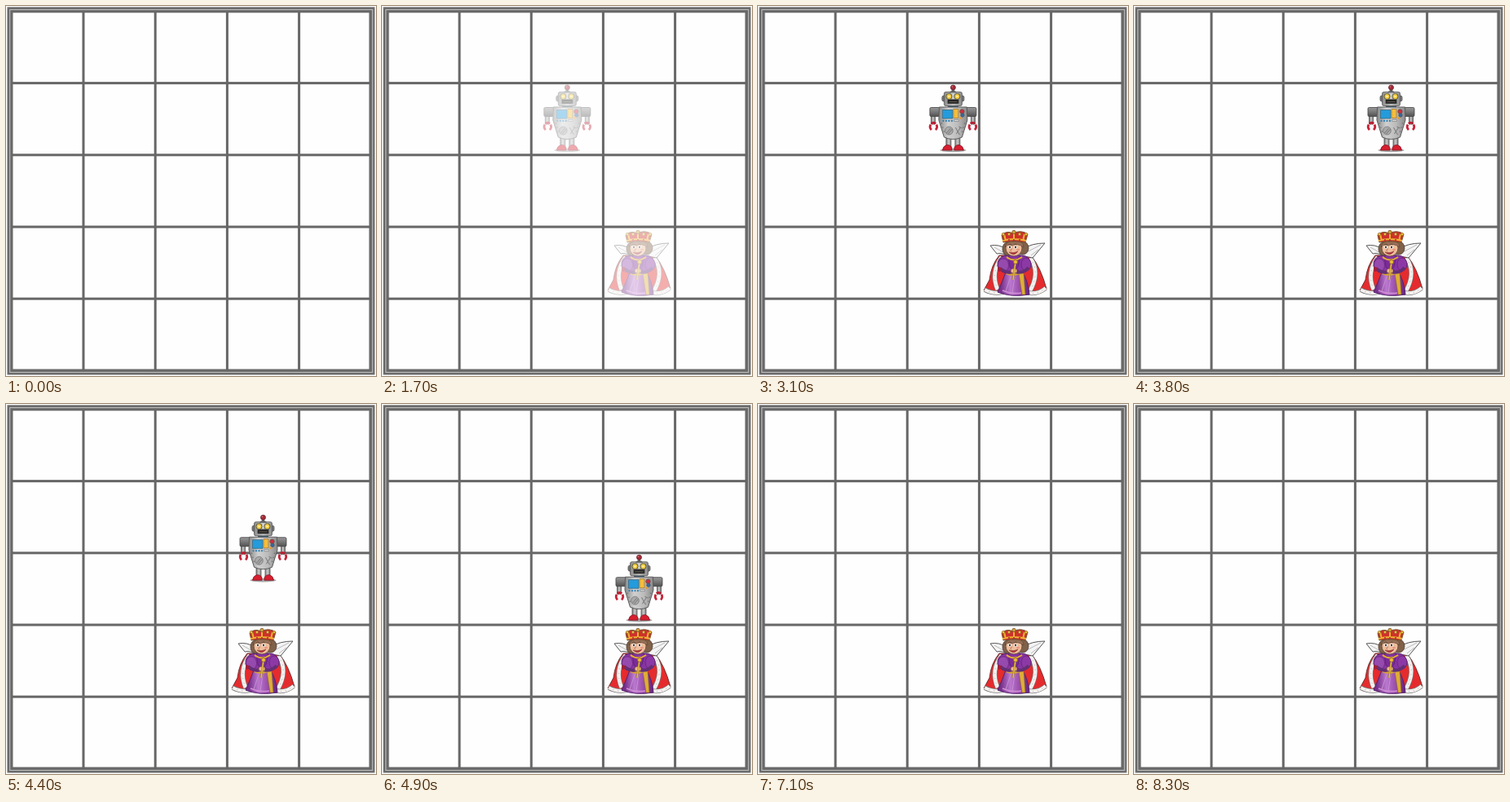
Write an HTML page with a canvas that moves like this. It is 454 by 454 pixels and loops after 8.5 s.

```html
<!DOCTYPE html>
<html lang="en">
<head>
<meta charset="utf-8">
<title>Robot and queen on a grid</title>
<style>
  html, body { margin: 0; width: 100%; height: 100%; overflow: hidden; background: #fefefe; }
  canvas { display: block; width: 454px; height: 454px; }
</style>
</head>
<body>
<canvas id="stage" width="454" height="454"></canvas>
<script>
const ctx = document.getElementById('stage').getContext('2d');
const LOOP = 8500, CELL = 88.2;

const clamp = v => Math.max(0, Math.min(1, v));
const progress = (t, from, to) => clamp((t - from) / (to - from));
const ease = p => p * p * (3 - 2 * p);

function paint(fill, stroke, width = 0.8) {
  if (fill) { ctx.fillStyle = fill; ctx.fill(); }
  if (stroke) { ctx.strokeStyle = stroke; ctx.lineWidth = width; ctx.stroke(); }
}
function box(x, y, w, h, fill, stroke, r = 0) {
  ctx.beginPath();
  ctx.roundRect(x, y, w, h, r);
  paint(fill, stroke);
}
function oval(x, y, rx, ry, fill, stroke, width) {
  ctx.beginPath();
  ctx.ellipse(x, y, rx, ry, 0, 0, Math.PI * 2);
  paint(fill, stroke, width);
}
function shape(d, fill, stroke, width) {
  const path = new Path2D(d);
  if (fill) { ctx.fillStyle = fill; ctx.fill(path); }
  if (stroke) { ctx.strokeStyle = stroke; ctx.lineWidth = width || 0.8; ctx.stroke(path); }
}
function gradient(x0, y0, x1, y1, ...colors) {
  const g = ctx.createLinearGradient(x0, y0, x1, y1);
  colors.forEach((c, i) => g.addColorStop(i / (colors.length - 1), c));
  return g;
}
function mirrored(draw) {
  for (const side of [-1, 1]) {
    ctx.save();
    ctx.scale(side, 1);
    draw(side);
    ctx.restore();
  }
}

function drawGrid() {
  ctx.fillStyle = '#fefefe';
  ctx.fillRect(0, 0, 454, 454);
  ctx.strokeStyle = '#696969';
  ctx.lineWidth = 7;
  ctx.strokeRect(5, 4.8, 444, 444.2);
  ctx.strokeStyle = '#bcbcbc';
  ctx.lineWidth = 1.1;
  ctx.strokeRect(4.7, 4.5, 445, 445);
  ctx.fillStyle = '#676767';
  for (let i = 1; i < 5; i++) {
    const p = 6.8 + i * CELL;
    ctx.fillRect(p - 1.5, 7, 3, 441);
    ctx.fillRect(7, p - 1.9, 441, 3);
  }
}

// Origin: top of the antenna, on the centre line.
function drawRobot() {
  oval(0, 80, 16, 2.2, 'rgba(60,60,60,.45)');

  mirrored(() => {
    box(2.5, 64, 6, 12, gradient(2, 0, 9, 0, '#777', '#ccc', '#666'), '#555');
    shape('M1.5 80V77Q3 73 8 73.5Q12.5 75 13 80Z', '#d71f30', '#801522');
    box(22, 37, 5, 11, gradient(22, 0, 27, 0, '#777', '#c8c8c8', '#666'), '#555');
    box(16, 27.5, 12.5, 11, gradient(0, 27, 0, 39, '#9b9b9b', '#777', '#4d4d4d'), '#444', 1.5);
    ctx.beginPath();
    ctx.arc(24, 50, 3.7, -0.25 * Math.PI, 1.25 * Math.PI, true);
    paint(null, '#b91f32', 3);
    shape('M20.5 48.5Q18.5 52 21.5 55M27.5 48.5Q29.5 52 26.5 55', null, '#c62338', 2.8);
  });

  box(-6, 23, 12, 5, '#315b78', '#444');
  shape('M-17 27H17L17.5 43L11 64Q0 69 -11 64L-17.5 43Z',
    gradient(-18, 0, 18, 0, '#858585', '#d0d0d0', '#bbbbbb', '#888888'), '#5b5b5b', 1);

  box(-13, 30.5, 12.5, 10.5, '#249bdc', '#37677f');
  box(0.5, 29.5, 6, 11, '#f5bd3b', '#a57a36');
  oval(11, 32.5, 2.7, 2.7, '#d22d3d', '#555');
  oval(11.5, 37, 2.2, 2.2, '#3568a0', '#555');
  oval(9.5, 40.5, 1.5, 1.5, '#e49b32');
  for (let x = -12; x < 0; x += 3.5) oval(x, 44, 1.15, 1.15, '#3382b4');
  box(1, 42.5, 6, 2, '#dddddd', '#888');

  oval(-5, 56, 4.8, 5, '#aaa', '#747474', 0.8);
  shape('M-8 59L-3 53M-6 60L-1 54M3 52L8 61M4 60L9 52M7 51L11 53',
    null, '#757575', 1);
  mirrored(() => {
    for (let y = 47; y < 62; y += 5) oval(14 - (y - 47) * .28, y, .7, .7, '#686868');
  });

  box(-13.5, 13, 27, 7, '#777', '#555', 2);
  box(-11, 8.5, 22, 17, gradient(-11, 0, 11, 0, '#868686', '#d2d2d2', '#888'), '#555', 2);
  box(-7, 17.5, 14, 5.5, '#252525', '#777', 1);
  shape('M-5 20.5H5', null, '#77705d', .7);
  mirrored(() => {
    oval(5, 14, 3.6, 3.6, '#f0c83b', '#5d5d45', 1);
    oval(5, 14, 1.3, 1.3, '#fff0a2');
  });
  shape('M-4 9Q0 4 4 9Z', '#777', '#4e4e4e');
  box(-1, 4, 2, 4, '#555');
  oval(0, 3, 3, 3, '#a72a38', '#5d2830');
  oval(-1, 2, .8, .8, '#e97d7c');
}

function drawQueen() {
  // Cape and ermine
  shape('M296 306Q286 318 284 336L277 349Q290 356 306 352L326 352Q343 355 354 347Q347 321 335 306Z',
    '#e52b2d', '#6d3030', 1);
  shape('M299 308Q285 327 294 348M334 309Q347 327 333 351', null, '#777', 6);
  shape('M299 308Q285 327 294 348M334 309Q347 327 333 351', null, '#f4f0ee', 4.6);
  shape('M278 348Q289 354 301 351M331 352Q344 354 353 346', null, '#777', 5.5);
  shape('M278 348Q289 354 301 351M331 352Q344 354 353 346', null, '#f5f2f0', 4.2);
  ctx.setLineDash([1, 5]);
  shape('M299 308Q285 327 294 348M334 309Q347 327 333 351M278 348Q289 354 301 351M331 352Q344 354 353 346',
    null, '#aaa', 1);
  ctx.setLineDash([]);

  // Stand-up collar
  shape('M285 294Q296 292 304 298L309 309Q301 302 293 304Z', '#f4f4f4', '#555', 1);
  shape('M352 291Q336 291 325 298L320 309Q329 306 337 309Z', '#f4f4f4', '#555', 1);
  shape('M290 296L304 304M347 293L326 304M335 306L344 299', null, '#aaa', .8);

  // Dress
  shape('M305 324Q300 338 294 351Q311 358 333 354Q332 338 323 324Z',
    gradient(298, 0, 333, 0, '#75308a', '#bb78cf', '#984ca9', '#64227c'), '#55236c', 1);
  shape('M303 306Q293 309 294 319Q297 328 308 328L313 319L323 328Q336 324 335 316Q332 306 324 306Z',
    '#8734a3', '#56236a', 1);
  oval(301, 318, 6.5, 8, '#964aae', '#672777', .7);
  oval(329, 317, 6, 8, '#8c39a5', '#602270', .7);
  shape('M307 307Q314 315 322 307L319 320L314 326L309 320Z', '#7c2b99', '#54206b', .7);
  shape('M305 308Q314 315 324 308', null, '#e4ac36', 2);
  shape('M320 328L324 354L328 354L326 328Z', '#dfae35', '#8c662c', .6);
  shape('M305 328Q314 332 324 326', null, '#dba430', 3);
  shape('M300 349Q312 354 323 352', null, '#d391d7', 1.4);
  shape('M310 332L304 350M315 332L312 352', null, '#c290cf', 1);

  // Hands and sceptre
  shape('M297 322Q306 329 313 326M332 321Q325 329 316 326', null, '#633075', 4);
  oval(314, 325, 4, 3, '#f0b895', '#80563d');
  shape('M316 314L313 336', null, '#98752d', 2.3);
  shape('M316 314L313 336', null, '#efc44b', 1.2);
  oval(316, 314, 2.5, 2.5, '#efbe37', '#8c642a');
  oval(296, 323, 2, 3, '#a51f35');

  // Hair and face
  oval(306, 298, 6, 8, '#806149', '#4e3b32');
  oval(325, 297, 7, 8, '#806149', '#4e3b32');
  oval(314, 297, 10, 10, '#efbd9b', '#66473a');
  shape('M303 296Q304 288 315 289Q326 288 326 296Q317 290 312 294Q307 291 303 296Z',
    '#987057', '#61483a', .7);
  mirroredFace();
  shape('M312 298Q308 299 311 301', null, '#ac6b51', .9);
  shape('M308 302Q314 308 319 301Q314 304 308 302Z', '#b72f38', '#713335', .5);
  oval(319, 299, 2, 1.3, '#e79683');

  // Crown
  shape('M299 281Q305 275 313 279Q323 274 331 280L328 290Q314 287 301 290Z',
    '#cf302b', '#73502a', 1);
  shape('M300 288Q314 284 329 288M302 280L304 288M314 279V286M327 280L325 288',
    null, '#edb52f', 2);
  for (const x of [301, 308, 321, 329]) oval(x, 280, 1.7, 1.7, '#edbd40', '#886128', .6);
  for (const x of [308, 314, 321]) oval(x, 287, 1, 1, '#ad2638');
  oval(314, 277.5, 2.2, 2.2, '#d7a337', '#70542c', .8);
}
function mirroredFace() {
  for (const x of [309, 316]) {
    oval(x, 296, 1.9, 2, '#fff');
    oval(x, 296, 1, 1.4, '#352d2a');
    shape(`M${x - 2} 293Q${x} 291 ${x + 2} 293`, null, '#60463a', .8);
  }
}

function withAlpha(alpha, draw) {
  if (alpha <= 0) return;
  // Compose opaque artwork first so overlapping parts fade together.
  ctx.save();
  draw();
  ctx.restore();
}

const sprites = {};
function bake(name, width, height, dx, dy, draw) {
  const layer = document.createElement('canvas');
  layer.width = width * 2;
  layer.height = height * 2;
  sprites[name] = layer;
  return { layer, width, height, dx, dy, draw };
}
function render(t) {
  drawGrid();
  const appear = ease(progress(t, 1450, 2050));
  const robotAlpha = appear * (1 - ease(progress(t, 5850, 6300)));
  const right = ease(progress(t, 2950, 3600));
  const down = ease(progress(t, 4100, 4750));

  fadePiece(appear, drawQueen);
  fadePiece(robotAlpha, () => {
    ctx.translate(227.3 + right * CELL, 97 + down * CELL);
    drawRobot();
  });
}

const backdrop = document.createElement('canvas');
backdrop.width = backdrop.height = 454;
const backdropCtx = backdrop.getContext('2d');

// Draws a piece at full strength, then lays the previous picture back over it.
function fadePiece(alpha, draw) {
  if (alpha <= 0) return;
  backdropCtx.drawImage(ctx.canvas, 0, 0);
  ctx.save();
  draw();
  ctx.restore();
  if (alpha < 1) {
    ctx.save();
    ctx.globalAlpha = 1 - alpha;
    ctx.drawImage(backdrop, 0, 0);
    ctx.restore();
  }
}

function tick() {
  render(performance.now() % LOOP);
  requestAnimationFrame(tick);
}
tick();
</script>
</body>
</html>
```
